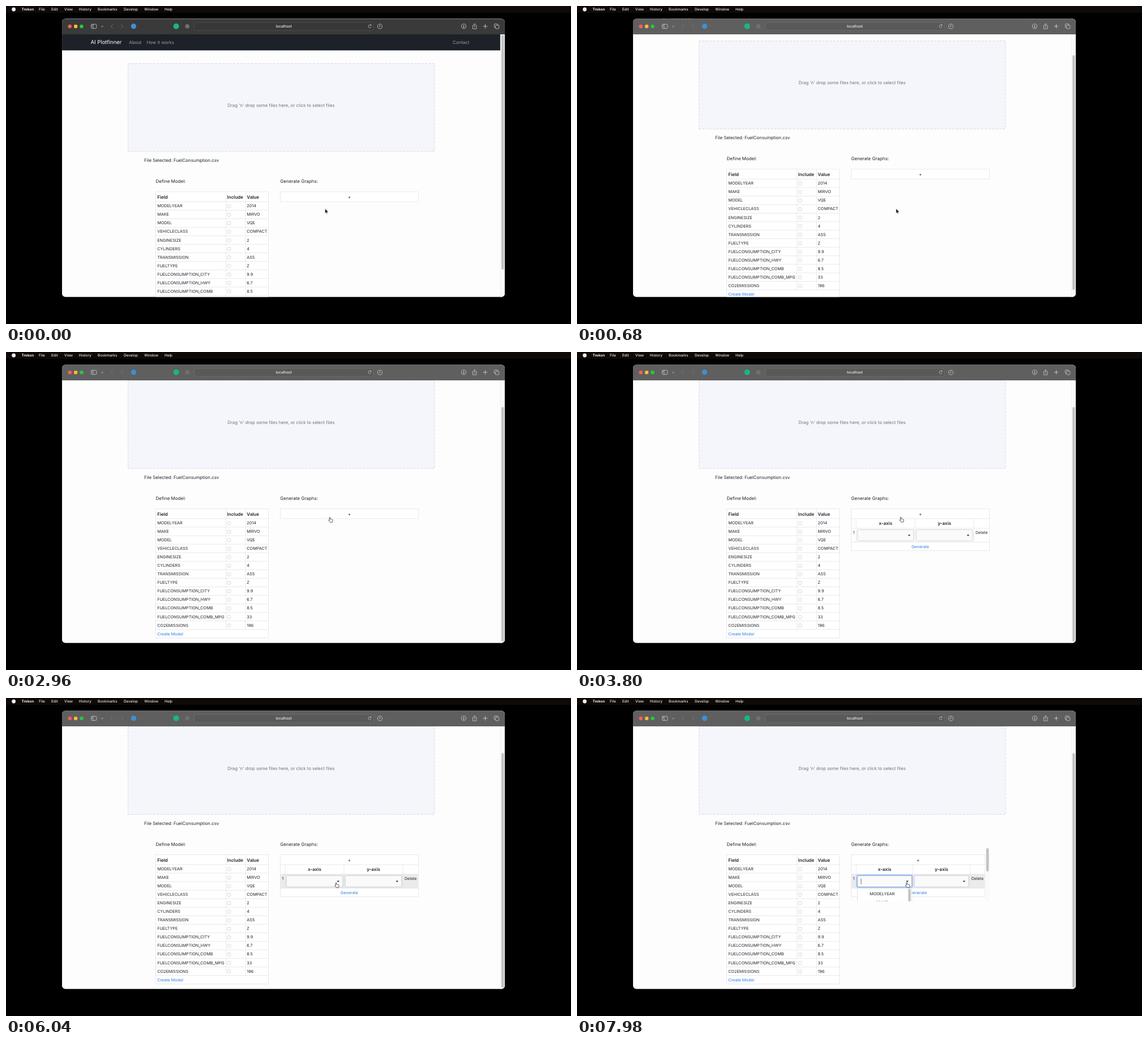
Recreate the animation shown at these times as an HTML page. Size 998x561 px, loop 8 s.

```html
<!DOCTYPE html>
<html lang="en">
<head>
<meta charset="utf-8">
<title>Model builder</title>
<style>
html, body { margin: 0; width: 100%; height: 100%; overflow: hidden; background: #000; }
svg { display: block; position: fixed; inset: 0; width: 100%; height: 100%; }
text { font-family: Inter, "Liberation Sans", sans-serif; text-rendering: geometricPrecision; white-space: pre; }
</style>
</head>
<body>
<svg id="stage" viewBox="0 0 998 561" xmlns="http://www.w3.org/2000/svg"></svg>
<script>
const LOOP = 8000;
const MAX_SCROLL = 51.3;
const INK = '#212529', LINE = '#dfe0e8', LINK = '#2a7de1';

// Markup helpers; text is placed by the vertical centre of its capitals.
const text = (x, mid, str, size, fill = INK, extra = '') =>
  `<text x="${x}" y="${(mid + size * 0.36).toFixed(2)}" font-size="${size}" fill="${fill}" ${extra}>${str}</text>`;
const MIDDLE = 'text-anchor="middle"';
const BOLD = 'font-weight="600"';
const rect = (x, y, w, h, fill, extra = '') =>
  `<rect x="${x}" y="${y}" width="${w}" height="${h}" fill="${fill}" ${extra}/>`;
const circle = (x, y, r, fill, extra = '') =>
  `<circle cx="${x}" cy="${y}" r="${r}" fill="${fill}" ${extra}/>`;
const path = (d, stroke, width = 0.8, extra = '') =>
  `<path d="${d}" fill="none" stroke="${stroke}" stroke-width="${width}" ${extra}/>`;
const line = (x1, y1, x2, y2, stroke = LINE) => path(`M${x1} ${y1}L${x2} ${y2}`, stroke, 0.7);
const group = (id, body, extra = '') => `<g id="${id}" ${extra}>${body}</g>`;

function menuBar() {
  const items = [['File', 58], ['Edit', 80], ['View', 103], ['History', 128.8], ['Bookmarks', 162],
    ['Develop', 208], ['Window', 244.2], ['Help', 280]];
  return rect(0, 0, 998, 12, '#0f0a08') + circle(13.6, 6, 3.4, '#f2f2f2') +
    text(27.5, 6, 'Trekon', 6.4, '#f4f4f4', 'font-weight="700"') +
    items.map(([s, x]) => text(x, 6, s, 6.4, '#ececec', 'font-weight="500"')).join('');
}

function toolbar() {
  const on = '#cfcfcf', off = '#777';
  const lights = ['#fe5f57', '#febc2e', '#28c840'];
  return rect(99, 22.5, 782, 27.5, '#3a3a3b', 'id="bar"') +
    lights.map((c, i) => circle(112.7 + i * 10.4, 36, 3.2, c)).join('') +
    rect(150.5, 32.2, 9.4, 7.4, 'none', `rx="1.4" stroke="${on}" stroke-width=".8"`) +
    path('M153.8 32.2V39.6M151.5 34H152.8M151.5 35.6H152.8', on) +
    path('M168 35.2L169.9 37L171.8 35.2', on) +
    path('M188.7 32.4L185.2 36L188.7 39.6M203.2 32.4L206.7 36L203.2 39.6', off, 0.9) +
    circle(225.4, 35.7, 4.7, '#3f8fd2') + circle(300.6, 35.8, 5, '#16b883') + circle(320.3, 35.8, 3.8, '#707070') +
    rect(332.5, 29, 316.5, 14, '#000', 'id="field" fill-opacity=".06" stroke="#fff" stroke-opacity=".13" stroke-width=".7" rx="3.5"') +
    text(490.7, 36, 'localhost', 6.5, '#f2f2f2', MIDDLE + ' font-weight="500"') +
    path('M644.6 34A2.6 2.6 0 1 0 645.1 36.5M644.9 32.3V34.3H642.9', on) +
    circle(660.4, 36, 4.2, 'none', `stroke="${on}" stroke-width=".8"`) + path('M660.4 33.4V36.3H658.6', on) +
    circle(808.5, 35.8, 4.1, 'none', `stroke="${on}" stroke-width=".8"`) +
    path('M808.5 33.4V38M806.7 36.3L808.5 38.1L810.3 36.3', on) +
    path('M826 34.2H824.4V40.2H831V34.2H829.4M827.7 37.6V31.2M825.8 33L827.7 31.1L829.6 33', on) +
    path('M846.5 32V39.6M842.7 35.8H850.3', on, 0.9) +
    rect(864.6, 33.8, 6.2, 6.2, 'none', `rx="1.2" stroke="${on}" stroke-width=".8"`) +
    path('M864.6 38H863.6Q862.4 38 862.4 36.8V32.8Q862.4 31.6 863.6 31.6H867.6Q868.8 31.6 868.8 32.8V33.8', on);
}

function modelTable() {
  const rows = [['MODELYEAR', '2014'], ['MAKE', 'MIRVO'], ['MODEL', 'VQE'], ['VEHICLECLASS', 'COMPACT'],
    ['ENGINESIZE', '2'], ['CYLINDERS', '4'], ['TRANSMISSION', 'AS5'], ['FUELTYPE', 'Z'],
    ['FUELCONSUMPTION_CITY', '9.9'], ['FUELCONSUMPTION_HWY', '6.7'], ['FUELCONSUMPTION_COMB', '8.5'],
    ['FUELCONSUMPTION_COMB_MPG', '33'], ['CO2EMISSIONS', '196']];
  const top = 327.9, first = 345.2, step = 15.05;
  const last = first + step * rows.length, bottom = last + step;
  let out = rect(264.6, top, 198.8, bottom - top, '#fff', `stroke="${LINE}" stroke-width=".7"`);
  out += text(267.2, 337, 'Field', 8, INK, BOLD) + text(390.6, 337, 'Include', 8, INK, BOLD) +
    text(425.3, 337, 'Value', 8, INK, BOLD);
  rows.forEach(([name, value], i) => {
    const y = first + step * i, mid = y + 7.5;
    out += line(264.6, y, 463.4, y) + text(267.2, mid, name, 7.25) + text(425.3, mid, value, 7.25) +
      rect(391.2, mid - 2.3, 5.6, 5.6, '#fff', 'rx="1.4" stroke="#c4c4ca" stroke-width=".7"');
  });
  return out + line(264.6, last, 463.4, last) + line(388.6, top, 388.6, last) + line(423, top, 423, last) +
    text(267.2, last + 7.5, 'Create Model', 7.2, LINK);
}

function select(x1, x2, extra = '') {
  const a = x2 - 8;
  return rect(x1, 364.6, x2 - x1, 20, '#fafafa', `rx="2" stroke="#c6c8cc" stroke-width=".8" ${extra}`) +
    `<path d="M${a - 2.3} 373.7h4.6l-2.3 2.6z" fill="#222"/>`;
}

function graphTable(right, c1, c2, id) {
  const left = 484.5, mid = (left + right) / 2;
  const [top, head, row, foot, bottom] = [327.9, 345.2, 362.2, 386.8, 401.8];
  return rect(left, top, right - left, bottom - top, '#fff', `stroke="${LINE}" stroke-width=".7"`) +
    rect(left, row, right - left, foot - row, '#ebebec', `id="${id}"`) +
    [head, row, foot].map(y => line(left, y, right, y)).join('') +
    [493, c1, c2].map(x => line(x, head, x, foot)).join('') +
    text(mid, 337, '+', 8, INK, MIDDLE) +
    text((493 + c1) / 2, 353.8, 'x-axis', 8, INK, MIDDLE + BOLD) +
    text((c1 + c2) / 2, 353.8, 'y-axis', 8, INK, MIDDLE + BOLD) +
    text(488.8, 369.9, '1', 7.2, INK, MIDDLE) +
    text((c2 + right) / 2, 369.9, 'Delete', 7.1, INK, MIDDLE) +
    text(mid, 394.3, 'Generate', 7.15, LINK, MIDDLE) +
    select(495.2, c1 - 2.2) + select(c1 + 2.2, c2 - 2.2);
}

function openTable() {
  return graphTable(720.8, 593.6, 694, 'rowOpen') +
    rect(721.2, 315.6, 8, 94.2, '#fafafa') + rect(722.8, 316.4, 4.6, 41, '#c2c2c4', 'rx="2.3"') +
    group('ring', rect(494.2, 363.6, 98.2, 22, 'none', 'rx="3" stroke="#0d6efd" stroke-opacity=".25" stroke-width="2"') +
      rect(495.2, 364.6, 96.2, 20, 'none', 'rx="2" stroke="#86b0f5" stroke-width=".9"')) +
    line(501.8, 370, 501.8, 379.6, '#333') +
    rect(495.4, 386.9, 95.8, 40, '#fff', 'rx="2" stroke="#d3d4d8" stroke-width=".7"') +
    text(539, 397, 'MODELYEAR', 7.2, INK, MIDDLE) + text(539, 412, 'MAKE', 7.2, INK, MIDDLE) +
    rect(584.4, 387.4, 6.4, 30, '#f7f7f7') + rect(585.2, 388, 4, 30, '#c2c2c4', 'rx="1.5"');
}

function page() {
  const grey = '#9b9d9f';
  return rect(99, 50, 774.5, 28.3, '#1d2228') +
    text(149.5, 64, 'AI Plotfinner', 9.5, '#fff') +
    text(217.2, 64, 'About', 7.9, grey) + text(248.4, 64, 'How it works', 7.9, grey) + text(789, 64, 'Contact', 7.9, grey) +
    rect(215.5, 101.6, 541.5, 155.2, '#f4f6fc', 'stroke="#d9dce4" stroke-width="1.1" stroke-dasharray="4 2.4"') +
    text(486, 175.3, "Drag 'n' drop some files here, or click to select files", 7.8, '#6c757d', MIDDLE) +
    text(244, 272, 'File Selected: FuelConsumption.csv', 7.85) +
    text(264.6, 309.4, 'Define Model:', 8) + text(484.3, 309.4, 'Generate Graphs:', 8) +
    modelTable() +
    group('empty', rect(484.5, 327.9, 244, 17.3, '#fff', `stroke="${LINE}" stroke-width=".7"`) + text(606.5, 337, '+', 8, INK, MIDDLE)) +
    group('wide', graphTable(728.5, 597, 701, 'rowWide')) +
    group('open', openTable(), 'clip-path="url(#panel)"');
}

const cursors =
  group('arrow', '<path d="M0 0V8.2L1.9 6.5L3.1 9.2L4.4 8.6L3.2 6H5.8Z" fill="#111" stroke="#fff" stroke-width=".5"/>') +
  group('hand', '<path d="M1.6 5.2V1.2Q1.6 .3 2.4 .3T3.2 1.2V3.4Q4.6 2.9 5 3.7Q6 3.4 6.3 4.2Q7.4 4.1 7.4 5.2V6.6Q7 8 6.6 9H3Q2.2 7.6 .3 5.8Q-.2 4.6 1.6 5.6Z" ' +
    'transform="translate(-2 0)" fill="#fff" stroke="#222" stroke-width=".75"/>');

document.getElementById('stage').innerHTML =
  `<defs><clipPath id="frame">${rect(99, 22.5, 782, 490.8, '#000', 'rx="6"')}</clipPath>` +
  `<clipPath id="panel">${rect(480, 315.6, 249.2, 94.2, '#000')}</clipPath></defs>` +
  rect(0, 0, 998, 561, '#000') + menuBar() +
  group('window', rect(99, 22, 782, 492, '#fdfdfd') + group('page', page()) +
    rect(873.4, 50, 8, 464, '#fafafa') + line(873.4, 50, 873.4, 514, '#e9e9e9') +
    rect(875.2, 51, 4.4, 414, '#c0c0c4', 'rx="2.2" id="thumb"') + toolbar(), 'clip-path="url(#frame)"') +
  rect(99.2, 22.8, 781.6, 490.2, 'none', 'rx="6" stroke="#fff" stroke-opacity=".22" stroke-width=".5"') +
  cursors;

const el = id => document.getElementById(id);
const clamp = v => Math.min(1, Math.max(0, v));
const show = (id, on) => el(id).setAttribute('display', on ? 'inline' : 'none');

// Keys are [time, ...values], joined by straight runs.
function track(keys, t) {
  const i = keys.findIndex(k => k[0] > t);
  if (i === 0) return keys[0].slice(1);
  if (i < 0) return keys[keys.length - 1].slice(1);
  const a = keys[i - 1], b = keys[i], u = (t - a[0]) / (b[0] - a[0]);
  return a.slice(1).map((v, n) => v + (b[n + 1] - v) * u);
}

const scrollKeys = [[120, 0], [200, 3], [420, 20.4], [640, 38], [860, 48.5], [1060, MAX_SCROLL]];
const pointerKeys = [[960, 563.6, 357.6], [1560, 569.6, 343.6], [2000, 571, 330], [2540, 571.5, 302], [2960, 571.6, 291.4],
  [3900, 571.6, 291], [4220, 570, 305], [4600, 568.8, 328.4], [5060, 572, 328.5], [5600, 582.6, 325.5], [7400, 582.6, 325.5], [7500, 582, 325.3]];
const ADDED = 3700, OPENED = 7500;

function draw(t) {
  const [scroll] = track(scrollKeys, t);
  const [x, y] = track(pointerKeys, t);
  el('page').setAttribute('transform', `translate(0 ${-scroll})`);
  el('thumb').setAttribute('y', 51 + scroll * 46 / MAX_SCROLL);

  // The bar brightens once the dark header has passed beneath it.
  const tone = Math.round(58 + 37 * clamp((scroll - 21) / 14));
  el('bar').setAttribute('fill', `rgb(${tone},${tone},${tone})`);

  show('empty', t < ADDED);
  show('wide', t >= ADDED && t < OPENED);
  show('open', t >= OPENED);
  show('rowWide', y > 311);
  el('ring').setAttribute('opacity', clamp((t - OPENED) / 150));

  const overAdd = y < 294, overList = t > 5000 && x > 576;
  const pointing = overAdd || overList;
  show('hand', pointing);
  show('arrow', !pointing);
  el(pointing ? 'hand' : 'arrow').setAttribute('transform', `translate(${x} ${y})`);
}

const start = performance.now();
function tick() {
  draw((performance.now() - start) % LOOP);
  requestAnimationFrame(tick);
}
tick();
</script>
</body>
</html>
```
